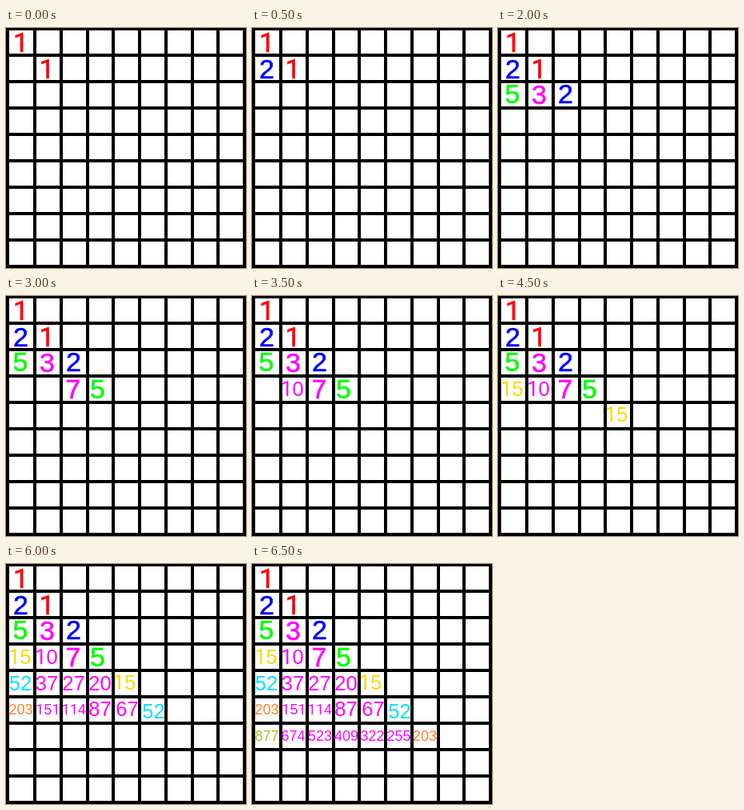
An HTML page that plays this animation: 300x300 px, repeating every 7 s.

```html
<!DOCTYPE html>
<html lang="en">
<head>
<meta charset="utf-8">
<title>Bell triangle</title>
<style>
  html, body { margin: 0; width: 100%; height: 100%; overflow: hidden; background: #fff; }
  svg { display: block; width: 100vw; height: 100vh; }
  text { font-family: "Liberation Sans", Arial, sans-serif; text-anchor: middle; }
  .large { stroke-width: 0.6px; }
  .one { font-family: Roboto, sans-serif; } /* a 1 without a foot */
</style>
</head>
<body>
<svg id="stage" viewBox="0 0 300 300"></svg>
<script>
const LOOP = 7000, STEP = 500, CELLS = 9;
const SIZES = { 1: 34, 2: 25.5, 3: 18 };
const RED = '#ff0000', BLUE = '#0000ff', PINK = '#ff00ff', GREEN = '#00ff00',
      GOLD = '#ffd800', CYAN = '#00e0ff', ORANGE = '#ff7f27', OLIVE = '#a4c425';

// step of appearance, number, colour, centre x, baseline y
const ENTRIES = [
  [0, '1', RED, 18.5, 30],
  [0, '1', RED, 51, 63],
  [1, '2', BLUE, 18.5, 63],
  [2, '2', BLUE, 84.5, 94],
  [3, '3', PINK, 51.5, 95],
  [4, '5', GREEN, 18, 94],
  [5, '5', GREEN, 114.5, 128],
  [6, '7', PINK, 84, 128],
  [7, '10', PINK, 50.5, 125],
  [8, '15', GOLD, 17.5, 125],
  [9, '15', GOLD, 148, 157],
  [10, '20', PINK, 117.5, 158],
  [10, '27', PINK, 84.5, 158],
  [11, '37', PINK, 51, 158],
  [11, '52', CYAN, 18, 158],
  [12, '52', CYAN, 184.5, 193],
  [12, '67', PINK, 151.5, 189.5],
  [12, '87', PINK, 117.5, 189.5],
  [12, '114', PINK, 85, 187.5],
  [12, '151', PINK, 52.5, 187.5],
  [12, '203', ORANGE, 18.5, 187.5],
  [13, '203', ORANGE, 216, 221],
  [13, '255', PINK, 183.5, 221],
  [13, '322', PINK, 150.5, 220.5],
  [13, '409', PINK, 118, 220.5],
  [13, '523', PINK, 85, 221],
  [13, '674', PINK, 51.5, 221],
  [13, '877', OLIVE, 18.5, 220.5]
];

const stage = document.getElementById('stage');

function add(parent, tag, attrs, content = '') {
  const node = document.createElementNS('http://www.w3.org/2000/svg', tag);
  for (const key in attrs) node.setAttribute(key, attrs[key]);
  node.textContent = content;
  return parent.appendChild(node);
}

add(stage, 'rect', { width: 300, height: 300, fill: '#fff' });
add(stage, 'rect', { width: 4, height: 300 });
for (let i = 0; i <= CELLS; i++) {
  if (i) add(stage, 'rect', { x: Math.round(1.6 + 32.7 * i), width: 4, height: 300 });
  add(stage, 'rect', { y: Math.round(32.95 * i - 0.8), width: 300, height: 4 });
}

const numbers = ENTRIES.map(([step, label, fill, x, y]) => {
  const node = add(stage, 'text', { x, y, fill, 'font-size': SIZES[label.length] });
  if (label.length === 1) {
    node.setAttribute('class', 'large');
    node.setAttribute('stroke', fill);
  }
  for (const digit of label) add(node, 'tspan', digit === '1' ? { class: 'one' } : {}, digit);
  return { step, node };
});

const start = performance.now();
function draw(now) {
  const current = Math.floor(Math.max(0, now - start) % LOOP / STEP);
  for (const { step, node } of numbers) {
    node.style.visibility = step <= current ? 'visible' : 'hidden';
  }
  requestAnimationFrame(draw);
}
draw(start);
</script>
</body>
</html>
```
